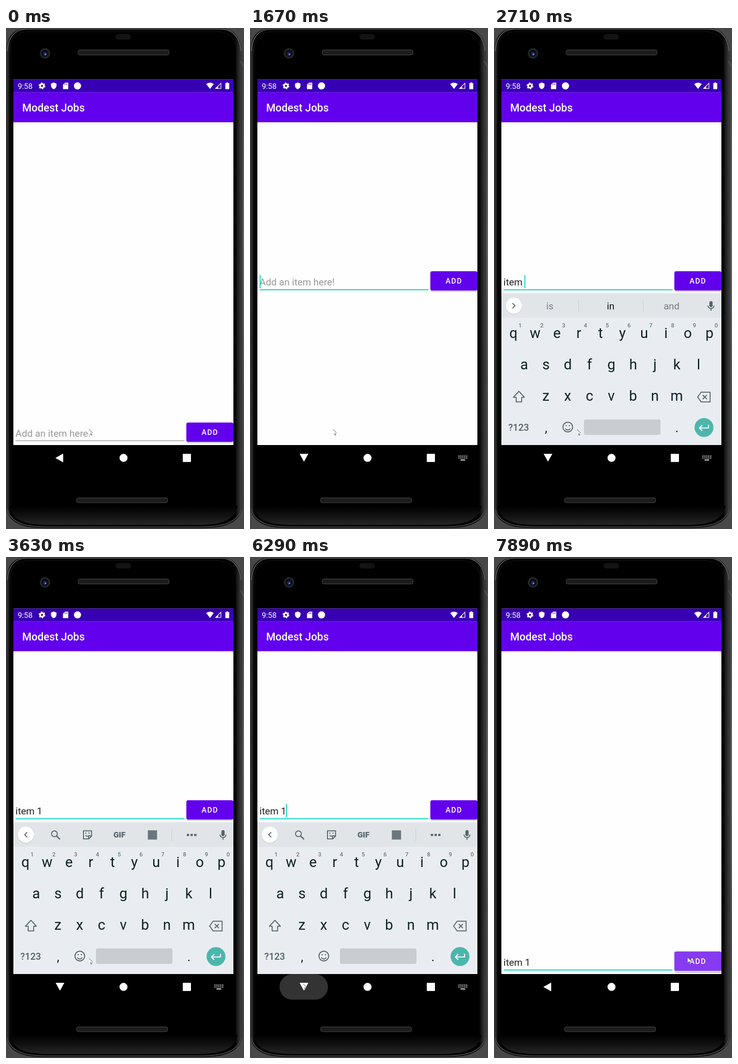
An HTML page for the animation above (8000 ms loop, 516 by 1086 pixels).

```html
<!DOCTYPE html>
<html lang="en">
<head>
<meta charset="utf-8">
<title>Todo app</title>
<style>
html, body { margin: 0; width: 100%; height: 100%; overflow: hidden; background: #000; }
svg { display: block; width: 100%; height: 100%; font-family: Roboto, sans-serif; }
text { white-space: pre; }
.mid { text-anchor: middle; }
.med { font-weight: 500; }
.icon { fill: none; stroke: #55646a; stroke-width: 2; }
</style>
</head>
<body>
<svg viewBox="0 0 516 1086">
  <defs>
    <linearGradient id="rim" x1="0" x2="516" y1="0" y2="0" gradientUnits="userSpaceOnUse">
      <stop offset="0" stop-color="#3a3a3a"/><stop offset=".008" stop-color="#2a2a2a"/>
      <stop offset=".016" stop-color="#080808"/><stop offset=".03" stop-color="#000"/>
      <stop offset=".962" stop-color="#000"/><stop offset=".972" stop-color="#1a1a1a"/>
      <stop offset=".984" stop-color="#343434"/><stop offset="1" stop-color="#4a4a4a"/>
    </linearGradient>
    <linearGradient id="chin" x1="0" x2="0" y1="0" y2="1">
      <stop offset="0" stop-color="#000"/><stop offset=".5" stop-color="#111"/><stop offset="1" stop-color="#262626"/>
    </linearGradient>
    <linearGradient id="side" x1="0" x2="0" y1="0" y2="1">
      <stop offset="0" stop-color="#4c4c4c"/><stop offset=".4" stop-color="#6a6a6a"/><stop offset="1" stop-color="#444"/>
    </linearGradient>
    <pattern id="mesh" width="2" height="3" patternUnits="userSpaceOnUse">
      <rect width="2" height="3" fill="#191919"/><rect width="1" height="1" fill="#2b2b2b"/>
    </pattern>
    <clipPath id="btnClip"><rect x="391" y="527.300" width="102" height="41.800" rx="4"/></clipPath>
  </defs>

  <!-- phone body -->
  <rect width="516" height="1086" fill="#484848"/>
  <path d="M1 52Q1 1 46 1H466Q506 1 512 52V1040Q508 1072 464 1081Q445 1084 420 1084H90Q64 1084 46 1081Q4 1072 1 1040z" fill="url(#rim)" stroke="#2c2c2c"/>
  <path d="M8 1036H502Q498 1064 462 1073Q445 1077 420 1077H90Q64 1077 46 1073Q11 1064 8 1036z" fill="url(#chin)"/>
  <path d="M3 1042Q8 1070 46 1078Q64 1081.500 90 1081.500H420Q445 1081.500 464 1078Q504 1070 510 1042" fill="none" stroke="#444" stroke-width="2"/>
  <path d="M3 50Q6 3 46 2.500H466Q504 3 510 50" fill="none" stroke="#686868" stroke-width="1.500"/>
  <path d="M8 60V50Q10 10 46 8H462Q496 10 501 50V70" fill="none" stroke="#181818"/>
  <path d="M511.500 72V1040" stroke="url(#side)" stroke-width="4"/>
  <path d="M513 72V1040h2.500V72z" fill="url(#side)"/>
  <path d="M508 72L515 84" stroke="#777"/>

  <rect x="237" y="13" width="34" height="12" rx="6" fill="#131313"/>
  <g fill="url(#mesh)" stroke="#504d49">
    <rect x="156.500" y="47.500" width="197" height="11" rx="4"/>
    <rect x="153" y="1018.500" width="197.500" height="10.500" rx="4"/>
  </g>
  <circle cx="84.500" cy="55" r="11.300" fill="#242424"/>
  <circle cx="84.500" cy="55" r="7.500" fill="#080a16"/>
  <circle cx="84.500" cy="56" r="4.500" fill="#18245a"/>
  <circle cx="85.500" cy="57" r="1.800" fill="#6d8ce0"/>

  <!-- screen -->
  <rect x="16" y="111.600" width="477" height="792.400" fill="#fefefe"/>
  <rect x="16" y="111.600" width="477" height="28" fill="#3700b3"/>
  <rect x="16" y="139.400" width="477" height="64.900" fill="#6200ee"/>
  <g fill="#fff">
    <text x="25.500" y="131.700" font-size="16.600">9:58</text>
    <text x="35" y="180.500" font-size="23.200" class="med">Modest Jobs</text>
    <circle cx="78" cy="125.500" r="4" fill="none" stroke="#fff" stroke-width="3.600"/>
    <circle cx="78" cy="125.500" r="6.300" fill="none" stroke="#fff" stroke-width="2" stroke-dasharray="3.300"/>
    <path d="M103.500 118L109.500 120.700V125Q109 130.500 103.500 132.800Q98 130.500 97.500 125V120.700z"/>
    <path d="M128 118.500H135V132.500H123.500V123z"/>
    <path d="M127.500 120.500v3M130 120.500v3M132.500 120.500v3" stroke="#3700b3"/>
    <circle cx="155" cy="125.500" r="7.800"/>
    <path d="M434 121.500Q442 115.500 450.500 121.500L442.300 132z"/>
    <path d="M466 119.500V131.200H454.500z" fill="none" stroke="#fff" stroke-width="1.300"/>
    <path d="M460 125.500V131.500H453.500z"/>
    <path d="M475.500 119.500H478V118H481.500V119.500H484V132.500H475.500z"/>
  </g>

  <!-- input row -->
  <g id="row">
    <text id="field" x="20.600" y="557.700" font-size="20.900"/>
    <rect id="compose" x="21" y="560" height="1.200" fill="#333"/>
    <rect id="line" x="21" width="366"/>
    <rect id="caret" y="535.500" width="2" height="28.500" fill="#10d4c4"/>
    <rect id="shadow" x="391.500" y="530" width="101.500" rx="4" fill="#000" opacity=".18"/>
    <rect x="391" y="527.300" width="102" height="41.800" rx="4" fill="#6200ee"/>
    <circle id="press" cx="424" cy="546" fill="#873bf1" clip-path="url(#btnClip)"/>
    <text x="424" y="554.400" font-size="16.200" letter-spacing="1.450" class="med" fill="#fff">ADD</text>
  </g>

  <!-- keyboard -->
  <g id="board">
    <rect x="16" y="574" width="477" height="330" fill="#e9edf1"/>
    <rect x="16" y="576" width="477" height="52" fill="#e1e5e8"/>
    <circle cx="43" cy="603" r="18" fill="#c9cdd0"/>
    <circle cx="43" cy="602" r="17.500" fill="#fff"/>
    <path id="chevron" class="icon"/>
    <g fill="#55646a">
      <rect x="467" y="592" width="7" height="13" rx="3.500"/>
      <path d="M464 601.500Q464.500 608 470.500 608T477 601.500M470.500 608v5" fill="none" stroke="#55646a" stroke-width="2"/>
    </g>
    <g id="chips" font-size="20.500" class="mid">
      <path d="M183.500 589V616M323.500 589V616" stroke="#c7cbce"/>
      <text x="121" y="610" fill="#757e83"/>
      <text x="253" y="610" fill="#111"/>
      <text x="385" y="610" fill="#757e83"/>
    </g>
    <g id="tools" class="icon">
      <circle cx="105" cy="600" r="6.300"/><path d="M109.500 604.500L117 612" stroke-width="2.600"/>
      <path d="M168 593.500H185.500V605L179.500 611H168zM185 604.500H179V611M172.500 603Q175 607 179 604"/>
      <path d="M172 598.500h2M179 598.500h2" stroke-width="2.500"/>
      <text x="246" y="608.300" class="mid" font-size="17" font-weight="900" fill="#55646a" stroke="none">GIF</text>
      <rect x="307.500" y="592.500" width="20" height="20" fill="#6a777c" stroke="none"/>
      <path d="M359.500 589V616" stroke="#c7cbce" stroke-width="1"/>
      <path d="M392 602.500h5M400 602.500h5M408 602.500h5" stroke-width="4.500"/>
    </g>
    <g id="keys" class="mid" font-size="31" fill="#0c2128"></g>
    <text x="53.500" y="872.700" font-size="20.500" class="mid med" fill="#4f6066">?123</text>
    <path class="icon" d="M54 787.500L66 800.500H60V810.500H48V800.500H42z" stroke-linejoin="round"/>
    <path class="icon" d="M449 789.500H468.500V810.500H449L441.500 800zM452.500 795.500l9 9M461.500 795.500l-9 9"/>
    <circle class="icon" cx="160" cy="865" r="10.500"/>
    <path class="icon" d="M154.500 868Q160 875 165.500 868"/>
    <path class="icon" d="M155 862h2.800M162.200 862h2.800" stroke-width="2.800"/>
    <rect x="195" y="848.500" width="166" height="33.500" rx="4" fill="#c9cdd1"/>
    <circle cx="455.300" cy="866" r="20.500" fill="#4db6ac"/>
    <path d="M465 860V867H446M451.500 861L445.500 867L451.500 873" fill="none" stroke="#fff" stroke-width="2.200"/>
  </g>

  <!-- navigation bar -->
  <rect id="ripple" y="904.500" height="55" rx="27.500"/>
  <path id="back" d="M-9.500 0L7.500-9.500V9.500z" fill="#fff"/>
  <circle cx="254.800" cy="931.800" r="8.700" fill="#fff"/>
  <rect x="383.300" y="923" width="17.700" height="17.700" rx="1.200" fill="#fff"/>
  <g id="ime" stroke="#fff" stroke-width="2">
    <path d="M452 928H471M452 932H471" stroke-dasharray="2.200 2"/>
    <path d="M456.500 936.300H466.500"/>
  </g>

  <g id="pointer">
    <path d="M0 0V11L2.500 8.700L4.200 12.800L6 12L4.300 8.100H8z" fill="#fff"/>
    <path d="M0 0L8 8.200M2.800 8.800L4.500 12.800L6.300 11.800L4.500 8.500" fill="none" stroke="#333" stroke-width=".9"/>
  </g>
</svg>
<script>
const LOOP = 8000;
const ROW_DROP = 327.9;
const $ = id => document.getElementById(id);
const set = (id, attrs) => {
  for (const k in attrs) $(id).setAttribute(k, attrs[k]);
};
const show = (id, on) => set(id, { visibility: on ? 'visible' : 'hidden' });

// Latest [time, ...values] step that has begun
const at = (steps, t) => steps.filter(s => s[0] <= t).pop().slice(1);

const key = (x, y, label, extra = '') => `<text x="${x}" y="${y}" ${extra}>${label}</text>`;
const keyRow = (letters, x, y) => [...letters].map((c, i) => key(x + i * 47.25, y, c)).join('');
$('keys').innerHTML =
  keyRow('qwertyuiop', 42, 672) + keyRow('asdfghjkl', 65.5, 739.5) + keyRow('zxcvbnm', 112.5, 808) +
  [...'1234567890'].map((c, i) => key(56.5 + i * 47.25, 649, c, 'font-size="12.500" font-weight="500" fill="#6f797e"')).join('') +
  key(113, 876, ',', 'font-size="27"') + key(396.5, 876, '.', 'font-size="27"');

const HINT = 'Add an item here!';
// text, caret x, composing underline width
const typing = [
  [0, HINT, 21, 0], [1820, 'ite', 43, 22], [2090, 'item', 61.5, 41],
  [2590, 'item ', 66, 0], [3080, 'item 1', 78, 0]
];
const words = [
  [0, 'ite', 'item', 'it', 700], [2090, 'items', 'item', 'itemized', 700],
  [2710, 'is', 'in', 'and', 400]
];
const caretOn = [
  [0, 0], [710, 1], [1140, 0], [1670, 1], [3630, 0], [4180, 1], [4600, 0],
  [5130, 1], [5560, 0], [6050, 1], [6440, 0], [7080, 1], [7440, 0]
];
const pointer = [
  [0, 180, 870], [3910, 168, 888], [4030, 146, 912], [4180, 134, 916], [4330, 126, 918],
  [5560, 119, 923], [5680, 115, 925], [6840, 117, 928], [6960, 160, 917], [7080, 243, 899],
  [7200, 330, 882], [7320, 392, 871], [7440, 420, 868]
];
const backTurn = [[0, 0], [990, 45], [1140, 90], [6440, 45], [6570, 0]];
// left, right, colour
const ripple = [
  [0, 64, 169, 'none'], [6170, 64, 169, '#1c1c1c'], [6290, 64, 169, '#333'],
  [6440, 58, 175, '#262626'], [6570, 54.5, 178.5, '#111'], [6840, 54.5, 178.5, 'none']
];
const pressRadius = [[0, 0], [7750, 62], [7890, 80]];

function draw(t) {
  const [text, caretX, underline] = at(typing, t);
  const focused = t >= 400, raised = t >= 1390 && t < 6440;
  set('row', { transform: `translate(0 ${raised ? 0 : ROW_DROP})` });
  $('field').textContent = text;
  set('field', { fill: text === HINT ? '#979797' : '#222' });
  set('compose', { width: underline });
  set('line', focused ? { y: 566.3, height: 2.2, fill: '#17d3c3' } : { y: 566.2, height: 1.2, fill: '#858585' });
  set('caret', { x: caretX });
  show('caret', at(caretOn, t)[0]);

  const [radius] = at(pressRadius, t);
  set('press', { r: radius });
  set('shadow', { height: radius ? 44 : 42 });

  const board = t >= 1820 && t < 6440, tools = t >= 3230;
  set('board', { display: board ? 'inline' : 'none' });
  show('chips', board && t < 3080);
  show('tools', board && tools);
  set('chevron', { d: tools ? 'M46 596.500L40.500 602L46 607.500' : 'M40 596.500L45.500 602L40 607.500' });
  const [left, mid, right, weight] = at(words, t);
  const labels = $('chips').querySelectorAll('text');
  [left, mid, right].forEach((w, i) => labels[i].textContent = w);
  labels[1].setAttribute('font-weight', weight);

  const [turn] = at(backTurn, t), k = turn / 90;
  set('back', { transform: `translate(${116.5 + k * .5} ${932 - k * 1.5}) rotate(${-turn})` });
  show('ime', t >= 990 && t < 6440);
  const [x0, x1, fill] = at(ripple, t);
  set('ripple', { x: x0, width: x1 - x0, fill });
  set('pointer', { transform: `translate(${at(pointer, t).join(' ')})` });
}

const start = performance.now();
function tick() {
  draw((performance.now() - start) % LOOP);
  requestAnimationFrame(tick);
}
tick();
</script>
</body>
</html>
```
